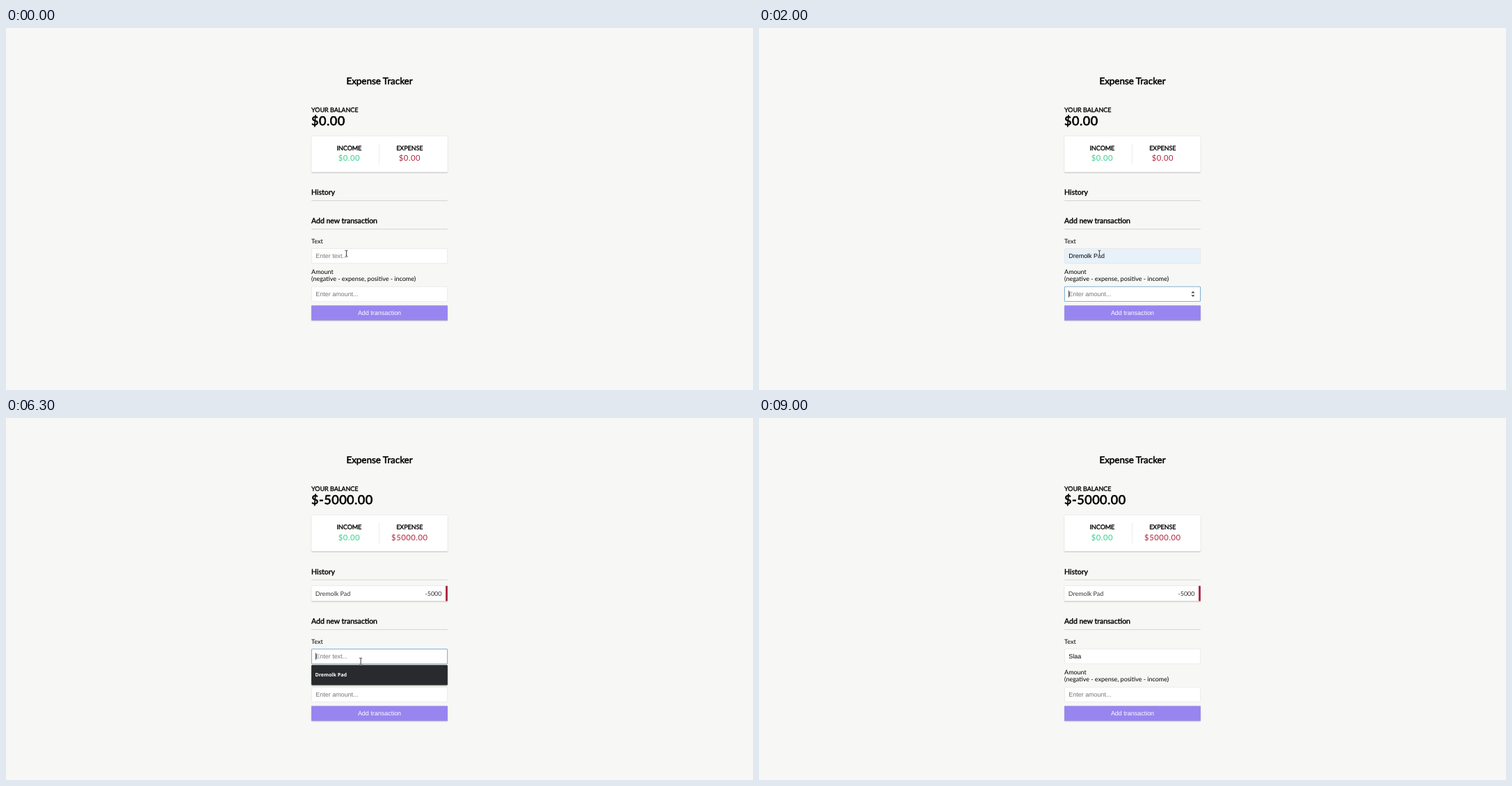
An HTML page that plays this animation: 1074x521 px, repeating every 9.1 s.

```html
<!DOCTYPE html>
<html lang="en">
<head>
<meta charset="utf-8">
<title>Expense Tracker</title>
<style>
  html, body { margin: 0; width: 100%; height: 100%; overflow: hidden; background: #f7f7f6; }
  svg { display: block; width: 100%; height: 100%; }
  text { font-family: Lato, sans-serif; font-size: 16px; white-space: pre; text-rendering: geometricPrecision; }
  .bold { stroke: currentColor; stroke-width: .04em; }
  .h1 { font-size: 32px; letter-spacing: 1px; }
  .h2 { font-size: 24px; }
  .h3 { font-size: 18.72px; }
  .money { font-size: 20px; letter-spacing: 1px; }
  .field { font-family: "Liberation Sans", Arial, sans-serif; }
  .menu { font-family: "Noto Sans", sans-serif; font-size: 12.7px; font-weight: 600; }
  .mid { text-anchor: middle; }
  .end { text-anchor: end; }
  .card { filter: drop-shadow(0 1px 1.5px rgba(0,0,0,.12)) drop-shadow(0 1px 1px rgba(0,0,0,.24)); }
  .pop { filter: drop-shadow(0 1px 2px rgba(0,0,0,.3)); }
</style>
</head>
<body>
<svg id="stage" viewBox="0 0 1074 521"></svg>
<script>
const LOOP = 9100, TICK = 100;
const SCALE = 1074 / 1920;           // the page is laid out 1920 units wide
const LEFT = 785, WIDE = 350, RIGHT = LEFT + WIDE, PAD = 796;
const ITEM = 'Dremolk Pad';
const GREEN = '#35d08c', RED = '#aa233c', PURPLE = '#9885f0', BLUE = '#82b3d3';

// Timelines: [tick, value], each value holds until the next entry.
const textValue = [[0, ''], [15, ITEM], [45, ''], [66, ITEM], [67, ''], [75, 'S'], [76, 'Sl'.slice(0, 1)], [77, 'Sla'], [78, 'Slaa']];
const amountValue = [[0, ''], [24, '-'], [26, '-5'], [27, '-50'], [28, '-500'], [37, '-5000'], [45, '']];
const focus = [[0, ''], [5, 'text'], [20, 'amount'], [43, ''], [63, 'text'], [90, '']];
const caret = [[0, 1], [10, 0], [15, 1], [34, 0], [37, 1], [42, 0], [63, 1], [69, 0], [75, 1], [84, 0], [89, 1]];
const tinted = [[0, 0], [15, 1], [45, 0], [66, 1], [67, 0]];
const hovered = [[0, 0], [15, 1], [18, 0], [66, 1], [67, 0]];
const menuAlpha = [[0, 0], [5, 1], [17, .52], [18, 0], [63, 1], [76, .52], [77, 0]];
const spinner = [[0, 0], [20, 1], [43, 0], [48, 1], [50, 0], [53, 1], [56, 0]];
const pointer = [
  [0, ['beam', 489.4, 324.5]], [39, ['beam', 497, 365]], [40, ['hand', 503, 402]],
  [42, ['hand', 504, 408]], [48, ['beam', 504, 406]], [50, ['arrow', 640, 350]],
  [51, ['arrow', 770, 302]], [52, ['arrow', 690, 350]], [53, ['beam', 570, 395]],
  [54, ['beam', 504, 405]], [56, ['hand', 500, 421]], [57, ['arrow', 497, 440]],
  [58, ['hand', 500, 426]], [59, ['beam', 507, 392]], [60, ['beam', 510, 350]],
  [66, ['arrow', 511, 362]], [67, ['beam', 511, 336.5]], [72, ['beam', 513, 338]],
  [84, ['arrow', 430, 290]], [85, ['arrow', 310, 232]], [86, ['arrow', 195, 178]], [87, ['', 0, 0]]
];

const at = (line, tick) => line.reduce((v, [start, next]) => tick >= start ? next : v, line[0][1]);

const pen = document.createElement('canvas').getContext('2d');
pen.font = '16px "Liberation Sans", Arial, sans-serif';
const widthOf = s => pen.measureText(s).width;

const text = (x, y, s, cls = '', color = '#000') =>
  `<text x="${x}" y="${y}" class="${cls}" fill="${color}" color="${color}">${s}</text>`;
const rect = (x, y, w, h, fill, more = '') =>
  `<rect x="${x}" y="${y}" width="${w}" height="${h}" fill="${fill}" ${more}/>`;
const shift = (dy, body) => `<g transform="translate(0 ${dy})">${body}</g>`;
const heading = (y, s) => text(LEFT, y, s, 'h3 bold') + rect(LEFT, y + 14.5, WIDE, 1, '#bbb');

function summary(spent) {
  return text(960, 145, 'Expense Tracker', 'h2 bold mid') +
    text(LEFT, 216, 'YOUR BALANCE', 'bold') +
    text(LEFT, 250.5, spent ? '$-5000.00' : '$0.00', 'h1 bold') +
    rect(LEFT, 278, WIDE, 93, '#fff', 'class="card"') +
    rect(959, 298, 1, 53, '#dedede') +
    text(882, 314, 'INCOME', 'bold mid') + text(882, 342, '$0.00', 'money mid', GREEN) +
    text(1037.5, 314, 'EXPENSE', 'bold mid') +
    text(1037.5, 342, spent ? '$5000.00' : '$0.00', 'money mid', RED) +
    heading(429.5, 'History');
}

function historyRow() {
  return rect(LEFT, 432, WIDE, 39, '#fff', 'class="card"') + rect(RIGHT - 5, 432, 5, 39, RED) +
    text(795, 458, ITEM, '', '#333') + text(1120, 458, '-5000', 'end', '#333');
}

function field(y, value, hint, focused, showCaret, tint) {
  const edge = focused ? `stroke="${BLUE}" stroke-width="2"` : 'stroke="#dedede"';
  return rect(LEFT + .5, y + .5, WIDE - 1, 38, tint ? '#e7f1fa' : '#fff', `rx="2" ${edge}`) +
    text(PAD, y + 25, value || hint, 'field', value ? '#000' : '#757575') +
    (focused && showCaret ? rect(PAD + widthOf(value), y + 10.5, 1.3, 17.5, '#000') : '');
}

const spinButtons = y =>
  `<path d="M1111 ${y + 17}l4.5 -5 4.5 5zM1111 ${y + 22}l4.5 5 4.5 -5z" fill="#444"/>`;

function form(tick) {
  const active = at(focus, tick), on = at(caret, tick);
  return heading(502.5, 'Add new transaction') +
    text(LEFT, 554, 'Text') +
    field(567, at(textValue, tick), 'Enter text...', active === 'text', on, at(tinted, tick)) +
    text(LEFT, 632, 'Amount') + text(LEFT, 651, '(negative - expense, positive - income)') +
    field(665, at(amountValue, tick), 'Enter amount...', active === 'amount', on) +
    (at(spinner, tick) ? spinButtons(665) : '') +
    rect(LEFT, 714, WIDE, 38, PURPLE, 'class="card"') +
    text(960, 738.5, 'Add transaction', 'field mid', '#fff');
}

function menu(tick) {
  const alpha = at(menuAlpha, tick);
  if (!alpha) return '';
  const k = alpha < 1 ? .975 : 1;
  return `<g opacity="${alpha}" transform="translate(960 633.5) scale(${k}) translate(-960 -633.5)">` +
    rect(LEFT, 607.5, WIDE, 52, '#292a2d', 'rx="2" class="pop"') +
    (at(hovered, tick) ? rect(LEFT, 615, WIDE, 37, '#3f4043') : '') +
    text(794.5, 637.5, ITEM, 'menu', '#fff') + '</g>';
}

const shapes = {
  beam: '<path d="M-2 -4.3h1.4l.6 .5 .6 -.5h1.4M0 -3.8v7.6M-2 4.3h1.4l.6 -.5 .6 .5h1.4" fill="none" stroke="#fff" stroke-width="2"/>' +
    '<path d="M-2 -4.3h1.4l.6 .5 .6 -.5h1.4M0 -3.8v7.6M-2 4.3h1.4l.6 -.5 .6 .5h1.4" fill="none" stroke="#222" stroke-width=".9"/>',
  hand: '<path d="M-2.6 -4.3q.9 -.7 1.5 .3l1 2.6 2.8 .5q1.2 .4 1.1 1.8l-.4 3.4h-4.2l-2.5 -2.8q-.8 -1.2 .2 -1.5l1 .5z" fill="#111" stroke="#fff" stroke-width=".6"/>',
  arrow: '<path d="M-2.5 -4.5v8.4l2 -1.8 1.4 2.8 1.3 -.6 -1.3 -2.7h2.6z" fill="#111" stroke="#fff" stroke-width=".6"/>'
};

function cursor(tick) {
  const [kind, x, y] = at(pointer, tick);
  return kind ? `<g transform="translate(${x} ${y})">${shapes[kind]}</g>` : '';
}

const stage = document.getElementById('stage');
let shown = -1;

function draw(tick) {
  const spent = tick >= 45;
  stage.innerHTML = `<g transform="scale(${SCALE})">` +
    shift(spent ? -28 : 0, summary(spent)) + (spent ? historyRow() : '') +
    shift(spent ? 27 : 0, form(tick)) + shift(spent ? 28 : 0, menu(tick)) +
    '</g>' + cursor(tick);
}

const origin = performance.now();
function frame() {
  const tick = Math.floor((performance.now() - origin) % LOOP / TICK);
  if (tick !== shown) draw(shown = tick);
  requestAnimationFrame(frame);
}
frame();
</script>
</body>
</html>
```
